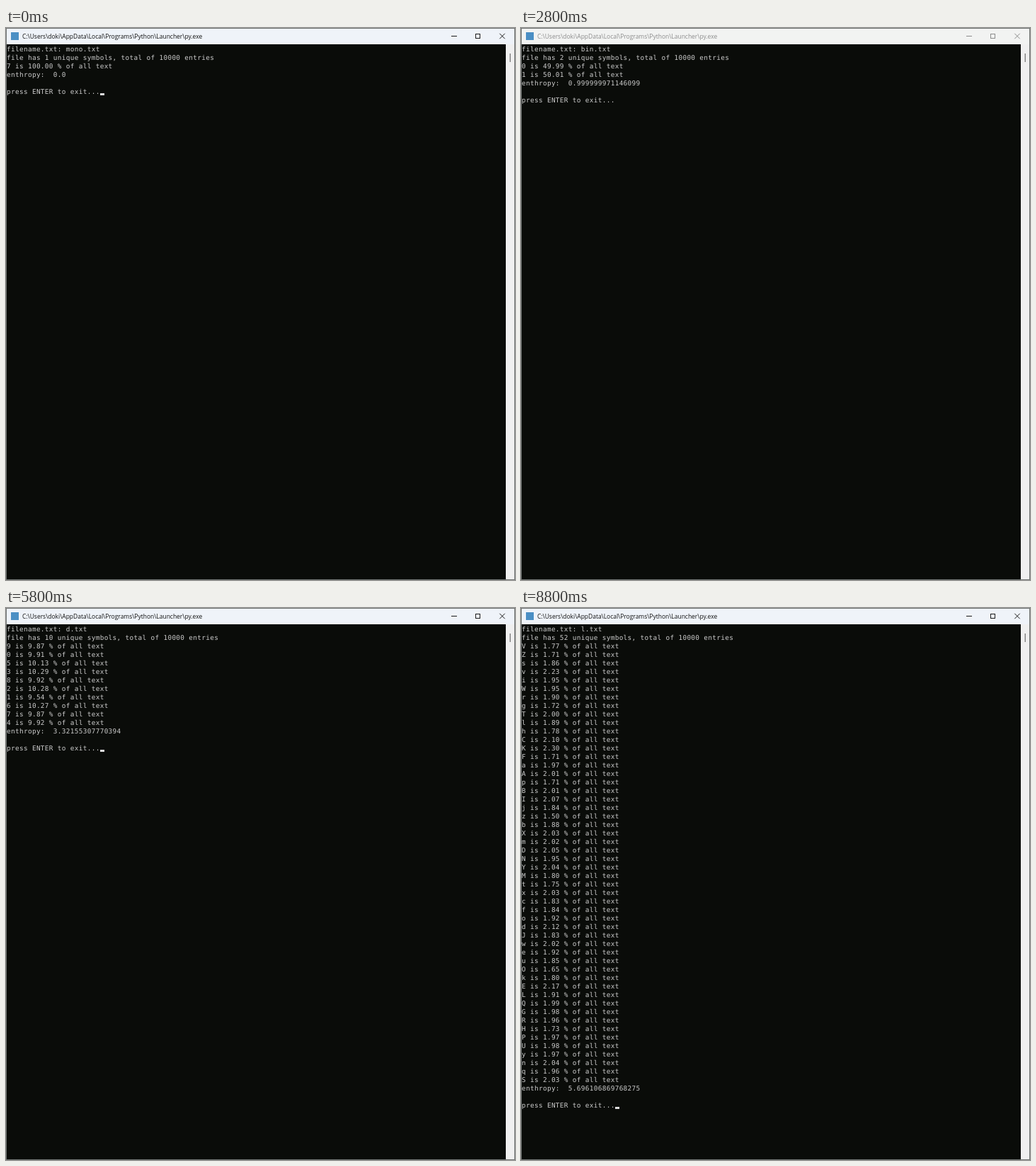
Write an HTML page that moves like this. It is 719 by 779 pixels and loops after 10000 ms.

```html
<!DOCTYPE html>
<html lang="en">
<head>
<meta charset="utf-8">
<title>Entropy console</title>
<style>
html, body { margin: 0; width: 100%; height: 100%; overflow: hidden; background: #0a0c09; }
svg { position: absolute; left: 0; top: 0; opacity: 0; }
.bar { fill: #eff3f9; }
.title { font: 8.47px "Open Sans", "Noto Sans", sans-serif; fill: #111; }
.buttons { fill: none; stroke: #1a1a1a; }
.idle .bar { fill: #f2f3f2; }
.idle .title { fill: #8c8c8c; }
.idle .buttons { stroke: #8c8c8c; }
.console text {
  font: 9.4px "DejaVu Sans Mono", "Noto Sans Mono", monospace;
  letter-spacing: .34px;
  fill: #ccc;
  white-space: pre;
  text-rendering: geometricPrecision;
}
</style>
</head>
<body>
<script>
const LOOP = 10000;
const ROW = 12, CELL = 6, BASE = 33;
const PATH = String.raw`C:\Users\doki\AppData\Local\Programs\Python\Launcher\py.exe`;
const PROMPT = 'press ENTER to exit...';

// Each share is a symbol followed by its percentage.
const scenes = [
  { from: 0, to: 1000, file: 'mono', shares: '7100.00', entropy: '0.0' },
  { from: 1000, to: 4000, file: 'bin', shares: '049.99 150.01', entropy: '0.999999971146099', idle: true },
  { from: 4000, to: 7000, file: 'd', entropy: '3.32155307770394',
    shares: '99.87 09.91 510.13 310.29 89.92 210.28 19.54 610.27 79.87 49.92' },
  { from: 7000, to: LOOP, file: 'l', entropy: '5.696106869768275',
    shares: 'V1.77 Z1.71 s1.86 v2.23 i1.95 W1.95 r1.90 g1.72 T2.00 l1.89 h1.78 C2.10 K2.30 ' +
      'F1.71 a1.97 A2.01 p1.71 B2.01 I2.07 j1.84 z1.50 b1.88 X2.03 m2.02 D2.05 N1.95 ' +
      'Y2.04 M1.80 t1.75 x2.03 c1.83 f1.84 o1.92 d2.12 J1.83 w2.02 e1.92 u1.85 O1.65 ' +
      'k1.80 E2.17 L1.91 Q1.99 G1.98 R1.96 H1.73 P1.97 U1.98 y1.97 n2.04 q1.96 S2.03' }
];

function report({ file, shares, entropy }) {
  const list = shares.split(' ');
  return [
    `filename.txt: ${file}.txt`,
    `file has ${list.length} unique symbols, total of 10000 entries`,
    ...list.map(s => `${s[0]} is ${s.slice(1)} % of all text`),
    `enthropy:  ${entropy}`,
    '',
    PROMPT
  ];
}

function draw(scene) {
  const lines = report(scene);
  const last = BASE + ROW * (lines.length - 1);
  const text = lines.map((s, i) => `<text x="1" y="${BASE + ROW * i}">${s}</text>`).join('');
  const cursor = scene.idle ? '' :
    `<rect x="${1 + CELL * PROMPT.length}" y="${last - 1}" width="${CELL}" height="3" fill="#ddd"/>`;
  return `<svg width="719" height="779" class="${scene.idle ? 'idle' : ''}">
    <rect width="719" height="779" fill="#0a0c09"/>
    <rect class="bar" width="719" height="23"/>
    <rect x="706" y="23" width="13" height="756" fill="#f0f0f0"/>
    <rect x="711.5" y="36" width="1.5" height="12" fill="#858585"/>
    <rect x="7" y="6" width="11" height="11" fill="#4b8fc4"/>
    <text class="title" x="23" y="15">${PATH}</text>
    <g class="buttons">
      <path d="M629 11.5h8"/>
      <rect x="663.5" y="8.5" width="6" height="6"/>
      <path d="M697.3 7.8l7.4 7.4m0-7.4l-7.4 7.4"/>
    </g>
    <g class="console">${text}${cursor}</g>
    <rect x=".5" y=".5" width="718" height="778" fill="none" stroke="#707472"/>
  </svg>`;
}

function steps({ from, to }) {
  const frames = [{ offset: 0, opacity: from ? 0 : 1 }];
  if (from) frames.push({ offset: from / LOOP, opacity: 1 });
  if (to < LOOP) frames.push({ offset: to / LOOP, opacity: 0 });
  frames.push({ offset: 1, opacity: to < LOOP ? 0 : 1 });
  return frames.map(f => ({ ...f, easing: 'steps(1, end)' }));
}

document.body.insertAdjacentHTML('beforeend', scenes.map(draw).join(''));
document.querySelectorAll('svg').forEach((el, i) =>
  el.animate(steps(scenes[i]), { duration: LOOP, iterations: Infinity }));
</script>
</body>
</html>
```
